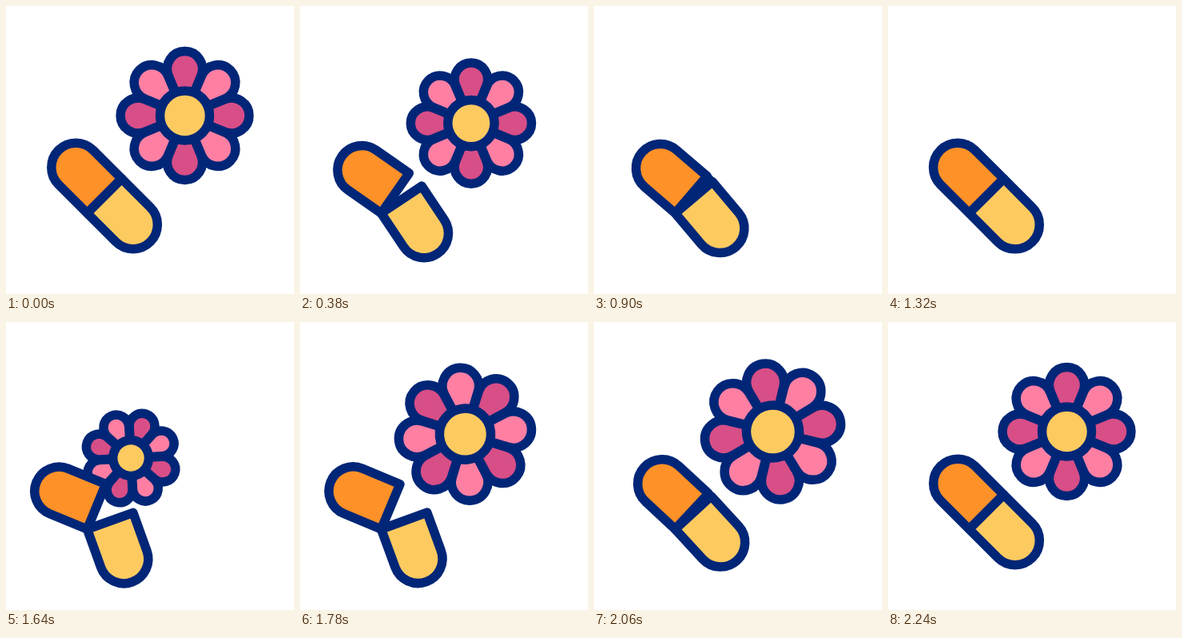
An HTML page that plays this animation: 360 px wide and 360 px high, repeating every 2.4 s.

```html
<!DOCTYPE html>
<html lang="en">
<head>
<meta charset="utf-8">
<title>Flower and capsule</title>
<style>
  html, body { margin: 0; width: 100%; height: 100%; overflow: hidden; background: #fff; }
  svg { display: block; width: 100vw; height: 100vh; }
</style>
</head>
<body>
<svg viewBox="0 0 360 360" stroke="#012677" stroke-width="11.5" stroke-linejoin="round">
  <g id="flower"></g>
  <path id="top" fill="#fe9128" d="M0 0V-50.6A30.5 30.5 0 0 1 61 -50.6V0Z"/>
  <path id="bottom" fill="#fdca60" d="M0 0V50.6A30.5 30.5 0 0 0 61 50.6V0Z"/>
</svg>
<script>
const LOOP = 2400, STEP = 20, STROKE = 11.5;
const HOME = [223.5, 137], BEND = [145, 146.5], INSIDE = [123, 237.5];
const SMALL = 0.37, BIG = 1.12;
const [flower, topHalf, bottomHalf] =
  ['flower', 'top', 'bottom'].map(id => document.getElementById(id));

let parts = '';
for (let i = 0; i < 8; i++) {
  parts += `<path transform="rotate(${i * 45})" fill="${i % 2 ? '#ff7fa3' : '#d84e87'}"
    d="M0 0L-20.4 -50.2A22 22 0 1 1 20.4 -50.2Z"/>`;
}
flower.innerHTML = parts + '<circle r="31" fill="#fdca60"/>';

const mix = (a, b, k) => a + (b - a) * k;
const span = (t, from, to) => Math.min(1, Math.max(0, (t - from) / (to - from)));
const sine = k => (1 - Math.cos(Math.PI * k)) / 2;

// Timing curve with horizontal end handles at a and b.
const ease = (a, b) => x => {
  if (x <= 0 || x >= 1) return x;
  let lo = 0, hi = 1, u;
  for (let i = 0; i < 24; i++) {
    u = (lo + hi) / 2;
    const v = 1 - u;
    if (3 * v * v * u * a + 3 * v * u * u * b + u * u * u < x) lo = u; else hi = u;
  }
  return u * u * (3 - 2 * u);
};
const sink = ease(0.63, 0.64);
const rise = ease(0.6, 0.62);
const turn = ease(0.49, 0.63);
const shut = ease(0.38, 0.25);

// How far the capsule is open, t ms after it starts.
const opening = t => t < 400 ? sine(span(t, 0, 400)) : 1 - shut(span(t, 400, 940));

function drawCapsule(t) {
  const open = opening(t < 1300 ? t - 200 : t - 1300);
  const place = angle => `translate(101.5 259) rotate(${angle - 45})`;
  topHalf.setAttribute('transform', place(-24 * open));
  bottomHalf.setAttribute('transform', place(26.7 * open));
}

function drawFlower(t) {
  let pos, scale, angle = 0;
  if (t < 1300) {
    const k = sink(span(t, 200, 800));
    pos = HOME.map((h, i) => mix(h, INSIDE[i], k));
    scale = mix(1, SMALL, k);
  } else {
    const k = rise(span(t, 1300, 1900));
    pos = HOME.map((h, i) => mix(mix(INSIDE[i], BEND[i], k), mix(BEND[i], h, k), k));
    scale = mix(SMALL, BIG, k) - (BIG - 1) * sine(span(t, 1900, 2240));
    angle = 90 * turn(span(t, 1300, 2240));
  }
  flower.setAttribute('visibility', t >= 1140 && t < 1340 ? 'hidden' : 'visible');
  flower.setAttribute('transform', `translate(${pos}) rotate(${angle}) scale(${scale})`);
  flower.setAttribute('stroke-width', STROKE / scale);
}

function render(now) {
  const t = Math.floor(now % LOOP / STEP) * STEP;
  drawCapsule(t);
  drawFlower(t);
}

const start = performance.now();
function tick() {
  render(performance.now() - start);
  requestAnimationFrame(tick);
}
tick();
</script>
</body>
</html>
```
